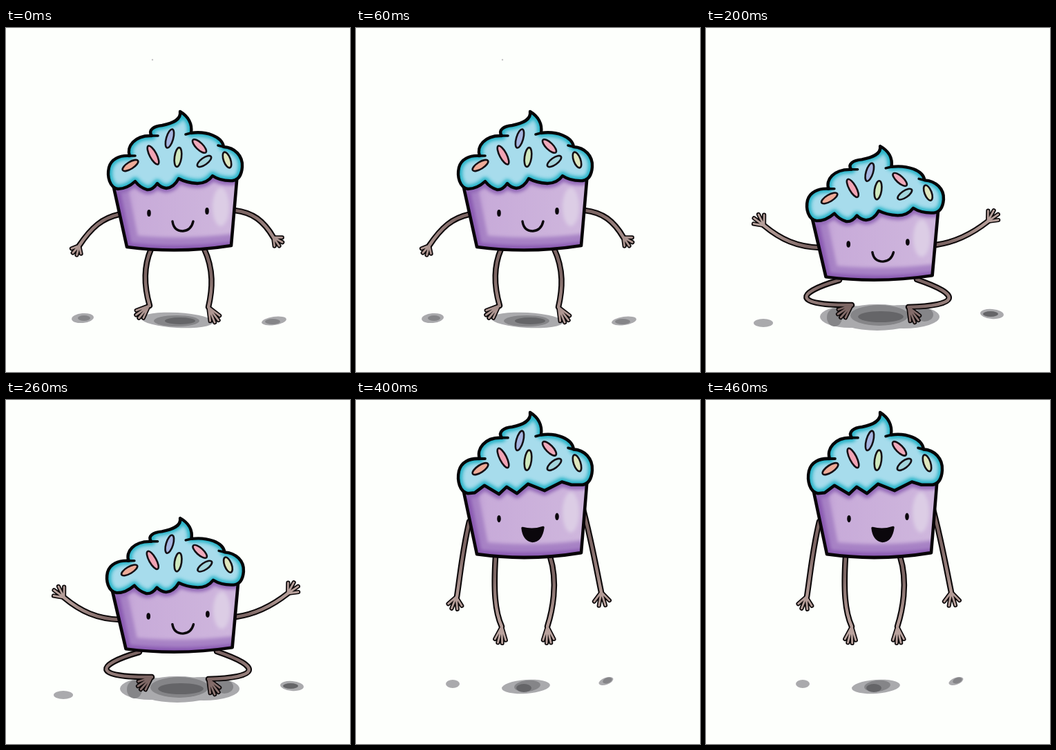
An HTML page that plays this animation: 498 px wide and 498 px high, repeating every 0.5 s.

```html
<!DOCTYPE html>
<html lang="en">
<head>
<meta charset="utf-8">
<title>Jumping cupcake</title>
<style>
html, body { margin: 0; width: 100%; height: 100%; overflow: hidden; background: #fdfffc; }
svg { display: block; width: 100vw; height: 100vh; }
</style>
</head>
<body>
<svg viewBox="0 0 498 498" stroke-linecap="round" stroke-linejoin="round">
  <defs>
    <linearGradient id="wrap">
      <stop offset="0" stop-color="#b793cf"/>
      <stop offset=".2" stop-color="#c8abd9"/>
      <stop offset="1" stop-color="#cfb7dd"/>
    </linearGradient>
    <radialGradient id="skin" gradientUnits="userSpaceOnUse" cx="247" cy="0" r="185">
      <stop offset=".55" stop-color="#7d6664"/>
      <stop offset=".85" stop-color="#b29a95"/>
      <stop offset="1" stop-color="#bca5a0"/>
    </radialGradient>
    <filter id="soft" x="-30%" y="-30%" width="160%" height="160%"><feGaussianBlur stdDeviation="2.5"/></filter>
    <filter id="haze" x="-30%" y="-30%" width="160%" height="160%"><feGaussianBlur stdDeviation=".6"/></filter>
    <path id="cup" d="M154 222L175 317Q250 327 326 315L335 210Z"/>
    <path id="icing"/>
    <clipPath id="inCup"><use href="#cup"/></clipPath>
    <clipPath id="inIcing"><use href="#icing"/></clipPath>
  </defs>
  <rect width="498" height="498" fill="#fdfffc"/>
  <circle id="speck" cx="212" cy="46" r="1.2" fill="#c4c4c4"/>
  <g id="shade" filter="url(#haze)"></g>
  <g fill="none">
    <g stroke="#0c0809">
      <path class="limb" stroke-width="8.6"/>
      <path class="digit" stroke-width="6.2"/>
    </g>
    <g stroke="url(#skin)">
      <path class="limb" stroke-width="4.4"/>
      <path class="digit" stroke-width="2.8"/>
    </g>
  </g>
  <g id="body">
    <use href="#cup" fill="url(#wrap)"/>
    <g clip-path="url(#inCup)" fill="none">
      <path d="M154 222L174 319Q250 328 328 318" stroke="#a782c5" stroke-width="40" filter="url(#soft)"/>
      <path d="M154 222L174 319Q250 328 328 318" stroke="#8a5ab2" stroke-width="17" filter="url(#soft)"/>
      <use href="#icing" stroke="#9267b7" stroke-width="13" filter="url(#soft)"/>
      <ellipse cx="311" cy="259" rx="12" ry="28" fill="#dccde5" filter="url(#soft)"/>
    </g>
    <use href="#cup" fill="none" stroke="#080408" stroke-width="4.6"/>
    <use href="#icing" fill="#a7dcec"/>
    <g clip-path="url(#inIcing)" fill="none">
      <use href="#icing" stroke="#25b4c8" stroke-width="12" filter="url(#soft)"/>
    </g>
    <use href="#icing" fill="none" stroke="#050608" stroke-width="4.4"/>
    <path d="M179 185L187 185M211 156L220 156M268 152L260 154M315 172L307 170" fill="none" stroke="#050608" stroke-width="3.6"/>
    <g id="bits" stroke="#151016" stroke-width="2.6"></g>
    <ellipse cx="207" cy="268" rx="2.8" ry="5" fill="#0b070c"/>
    <ellipse cx="291" cy="265" rx="2.8" ry="5" fill="#0b070c"/>
    <path id="mouth" stroke="#0b070c" stroke-width="3.4"/>
  </g>
</svg>
<script>
const el = id => document.getElementById(id);
const STEP = 100;

const icingTop = 'M162 233C150 231 146 215 149 202C152 190 164 184 179 185' +
  'C174 172 186 155 211 156C205 148 214 142 226 141C241 138 254 133 252 121' +
  'C264 128 270 139 268 152C290 149 313 157 315 172C331 173 343 185 342 201C341 214 336 220 328 221';
const scallops = 'Q311 222 299 214Q291 225 277 225Q261 224 250 218Q243 231 232 232' +
  'Q224 231 219 225Q212 235 204 234Q194 231 187 222Q175 233 162 233Z';
const zigzag = 'L312 221L298 217L273 229L249 220L233 233L218 224L207 234L186 222L172 232Z';

// x, y, turn, half length, colour
const sprinkles = [
  [180, 199, 58, 13, '#eeab98'], [213, 184, -28, 15, '#f0a3b4'],
  [237, 160, 16, 14, '#a6b4e0'], [249, 187, 8, 14, '#cfe8bd'],
  [280, 171, -46, 13, '#f0a9bb'], [287, 193, 54, 12, '#a3d5dc'],
  [320, 191, -20, 12, '#dfe6bd']
];

// limbs: [path, tip x, tip y, direction in degrees, digit length]
// shadows: [cx, cy, rx, ry, tilt, grey]
const light = '#aaaaad', mid = '#858588', dark = '#656568';
const poses = [
  { tip: 121, sy: 1, sx: 1, dx: 0, limbs: [
      ['M163 270C140 275 124 288 106 315', 106, 315, 118, 14],
      ['M331 264C357 267 373 279 387 303', 387, 303, 42, 15],
      ['M210 320C198 348 201 378 208 402', 207, 402, 137, 23],
      ['M287 320C301 350 299 378 293 404', 293, 404, 60, 24]],
    shadows: [[111, 420, 16, 7, -5, light], [113, 420, 9, 4, 0, mid],
      [248, 423, 52, 11, 3, light], [247, 424, 33, 8, 0, mid], [252, 424, 22, 5, 0, dark],
      [388, 424, 18, 6, -8, light], [386, 425, 11, 4, 0, mid]] },
  { tip: 147, sy: 1, sx: 1, dx: 1, limbs: [
      ['M166 300C139 296 113 300 88 311', 88, 311, 145, 15],
      ['M331 293C360 292 382 297 404 309', 404, 309, 35, 17],
      ['M206 347C158 364 156 397 211 399', 211, 399, 139, 24],
      ['M296 346C344 367 341 388 293 404', 293, 404, 60, 24]],
    shadows: [[88, 418, 21, 9, 0, light], [89, 420, 15, 6, 0, dark],
      [246, 423, 52, 13, 3, light], [246, 424, 39, 11, 0, mid], [249, 424, 28, 8, 0, dark],
      [404, 421, 19, 8, 0, light], [404, 422, 15, 6, 0, dark]] },
  { tip: 171, sy: .966, sx: 1.02, dx: 0, limbs: [
      ['M165 318C132 317 108 306 84 286', 84, 286, -130, 18],
      ['M333 314C361 310 384 299 408 280', 408, 280, -48, 18],
      ['M193 365C130 383 123 402 211 401', 211, 401, 139, 24],
      ['M305 364C373 387 365 402 293 404', 293, 404, 60, 24]],
    shadows: [[83, 427, 14, 6, 0, light], [208, 418, 43, 16, 0, light],
      [286, 418, 52, 17, 0, light], [248, 419, 59, 19, 0, light], [186, 419, 11, 13, 0, mid],
      [316, 415, 13, 10, 0, mid], [251, 416, 42, 15, 0, mid], [253, 418, 33, 8, 0, dark],
      [414, 414, 17, 7, 5, light], [412, 414, 11, 4, 0, dark]] },
  { tip: 77, sy: 1.055, sx: 1, dx: 0, jump: 1, limbs: [
      ['M165 230C149 268 136 290 118 311', 118, 311, 102, 17],
      ['M330 222C347 260 365 281 381 303', 381, 303, 57, 19],
      ['M207 288C204 325 202 353 206 383', 206, 383, 84, 24],
      ['M287 288C293 325 292 354 289 381', 289, 381, 88, 22]],
    shadows: [[112, 426, 15, 8, 0, light], [113, 427, 11, 5, 0, mid],
      [245, 427, 52, 13, 2, light], [255, 430, 39, 9, 0, mid], [249, 429, 24, 8, 0, dark],
      [391, 419, 20, 10, -15, light], [389, 421, 12, 6, -10, mid]] },
  { tip: 18, sy: 1.047, sx: 1, dx: 0, jump: 1, limbs: [
      ['M164 176C154 218 151 252 146 285', 145, 285, 98, 18],
      ['M328 155C341 204 347 239 355 278', 355, 278, 86, 20],
      ['M202 227C199 275 201 306 211 328', 211, 328, 96, 24],
      ['M281 227C293 265 284 306 277 328', 277, 328, 85, 24]],
    shadows: [[140, 411, 10, 6, 0, light], [246, 415, 35, 10, -4, light],
      [248, 414, 19, 8, -6, mid], [243, 417, 11, 6, 0, dark],
      [362, 407, 11, 5, -20, light], [364, 406, 7, 4, -20, mid]] }
];

const smile = 'M241 280Q243 294 256 294Q268 293 271 280';
const grin = 'M241 281Q256 285 271 280Q268 299 255 299Q243 297 241 281Z';

// Four digits fanned out from the end of a limb: hands are wider than feet.
function digits([, x, y, dir, len]) {
  const spread = len > 20 ? 15 : 27;
  return [0, 1, 2, 3].map(i => {
    const a = (dir + (i - 1.5) * spread) * Math.PI / 180;
    const r = len * (i % 3 ? 1 : .85);
    return `M${x} ${y}L${x + r * Math.cos(a)} ${y + r * Math.sin(a)}`;
  }).join('');
}

const ellipse = ([x, y, rx, ry, tilt, fill]) =>
  `<ellipse rx="${rx}" ry="${ry}" fill="${fill}" transform="translate(${x} ${y}) rotate(${tilt})"/>`;

const setPath = (name, d) =>
  document.querySelectorAll('.' + name).forEach(e => e.setAttribute('d', d));

el('bits').innerHTML = sprinkles.map(([x, y, turn, r, fill]) =>
  ellipse([x, y, 5, r, turn, fill])).join('');

function draw(n) {
  const p = poses[n];
  setPath('limb', p.limbs.map(l => l[0]).join(''));
  setPath('digit', p.limbs.map(digits).join(''));
  el('skin').setAttribute('cy', p.tip + 145);
  el('shade').innerHTML = p.shadows.map(ellipse).join('');
  el('icing').setAttribute('d', icingTop + (p.jump ? zigzag : scallops));
  el('mouth').setAttribute('d', p.jump ? grin : smile);
  el('mouth').setAttribute('fill', p.jump ? '#0b070c' : 'none');
  el('body').setAttribute('transform',
    `translate(${247 * (1 - p.sx) + p.dx} ${p.tip}) scale(${p.sx} ${p.sy}) translate(0 -121)`);
  el('speck').setAttribute('visibility', n ? 'hidden' : 'visible');
}

let shown = -1;
function tick() {
  const n = Math.floor(performance.now() / STEP) % poses.length;
  if (n !== shown) draw(shown = n);
  requestAnimationFrame(tick);
}
tick();
</script>
</body>
</html>
```
